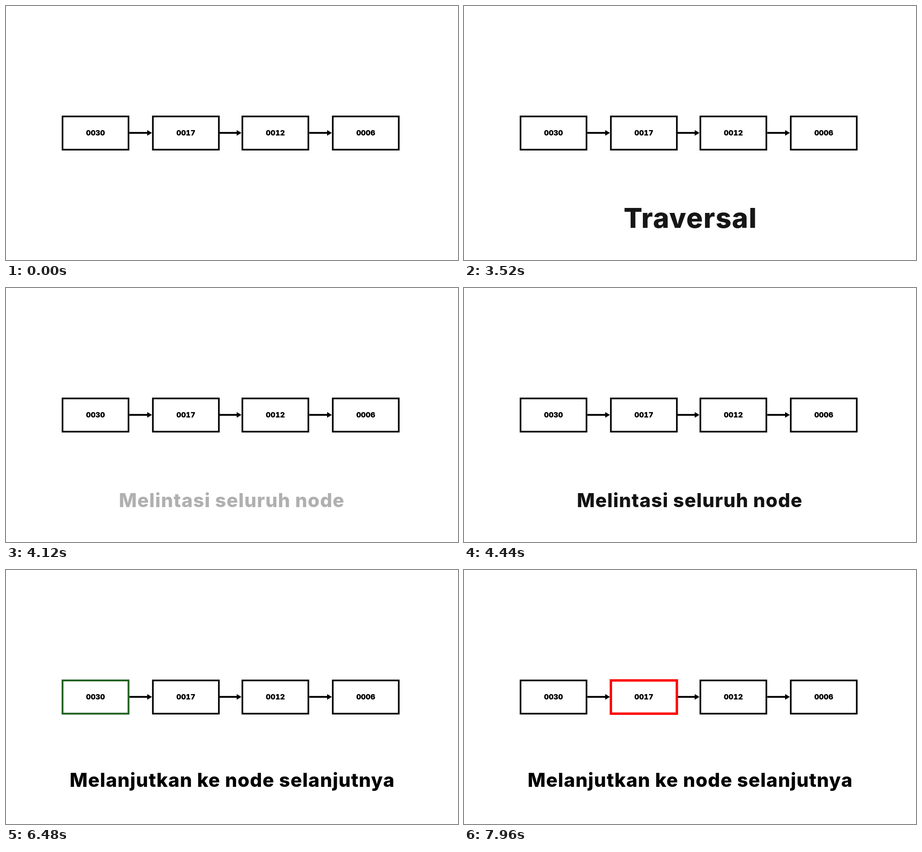
These frames come from a looping animation (998x561 px, 8000 ms). An HTML page:

```html
<!DOCTYPE html>
<html lang="id">
<head>
<meta charset="utf-8">
<title>Traversal</title>
<style>
  html, body { margin: 0; width: 100%; height: 100%; overflow: hidden; background: #fff; }
  svg { display: block; width: 998px; height: 561px; }
  text { font-family: Inter, "Open Sans", sans-serif; font-weight: 800; }
  .label { font-size: 16.2px; font-weight: 900; text-anchor: middle; font-variant-numeric: tabular-nums; }
  #title { font-size: 61px; letter-spacing: 1.2px; }
  #caption { font-size: 42px; letter-spacing: 1.1px; text-anchor: middle; }
</style>
</head>
<body>
<svg viewBox="0 0 998 561">
  <g id="list"></g>
  <text id="title" x="352.5" y="490"></text>
  <text id="caption"></text>
</svg>
<script>
const LOOP = 8000, THIN = 3.6, THICK = 5.3;
const $ = id => document.getElementById(id);
const ramp = (t, from, to) => Math.min(1, Math.max(0, (t - from) / (to - from)));

const nodes = [[124.8, '0030'], [324.3, '0017'], [521.9, '0012'], [721.5, '0006']];
const arrow = x => `<path d="M${x} 278.3h39.5v-4.3l10.5 6.3-10.5 6.3v-4.3h-39.5z"/>`;
const box = ([x, label]) =>
  `<rect x="${x}" y="243.9" width="145.7" height="73.4" fill="none"/>
   <text class="label" x="${x + 72.8}" y="286.2">${label}</text>`;
$('list').innerHTML = nodes.slice(1).map(([x]) => arrow(x - 52)).join('') + nodes.map(box).join('');
const rects = document.querySelectorAll('rect');

const word = 'Traversal';
const keyTimes = [1120, 1560, 1720, 1800, 1920, 2000, 2200, 2400, 2760];
const captions = [
  [3480, 'Melintasi seluruh node', 498.5, 483.5],
  [5480, 'Memulai traversal dari first', 499, 485],
  [6480, 'Melanjutkan ke node selanjutnya', 499.5, 479.3]
];

// k = 0 is plain black, k = 1 is full red; the hue turns on the way
function outline(rect, k, width) {
  rect.setAttribute('stroke', `hsl(${240 * (1 - k)} ${100 * k}% ${50 * k}%)`);
  rect.setAttribute('stroke-width', width);
}

function firstBox(t) {
  if (t < 5480) return outline(rects[0], 0, THIN);
  const k = 1 - ramp(t, 5980, 6980);
  const width = t < 5980
    ? 4.6 + (THICK - 4.6) * ramp(t, 5480, 5980)
    : THIN + (THICK - THIN) * k * k;
  outline(rects[0], k, width);
}

function secondBox(t) {
  const k = ramp(t, 6980, 7960);
  outline(rects[1], k, THIN + (THICK - THIN) * k * k);
}

function draw(t) {
  const title = $('title'), caption = $('caption');
  title.textContent = word.slice(0, keyTimes.filter(k => t >= k).length);
  title.setAttribute('opacity', 1 - ramp(t, 3480, 3920));

  const [, text, x, y] = captions.filter(c => t >= c[0]).pop() || captions[0];
  if (caption.textContent !== text) caption.textContent = text;
  caption.setAttribute('x', x);
  caption.setAttribute('y', y);
  caption.setAttribute('opacity', ramp(t, 3960, 4480));

  firstBox(t);
  secondBox(t);
}

rects.forEach(r => outline(r, 0, THIN));
const start = performance.now();
function tick() {
  const t = (performance.now() - start) % LOOP;
  draw(Math.floor(t / 40) * 40);
  requestAnimationFrame(tick);
}
tick();
</script>
</body>
</html>
```
